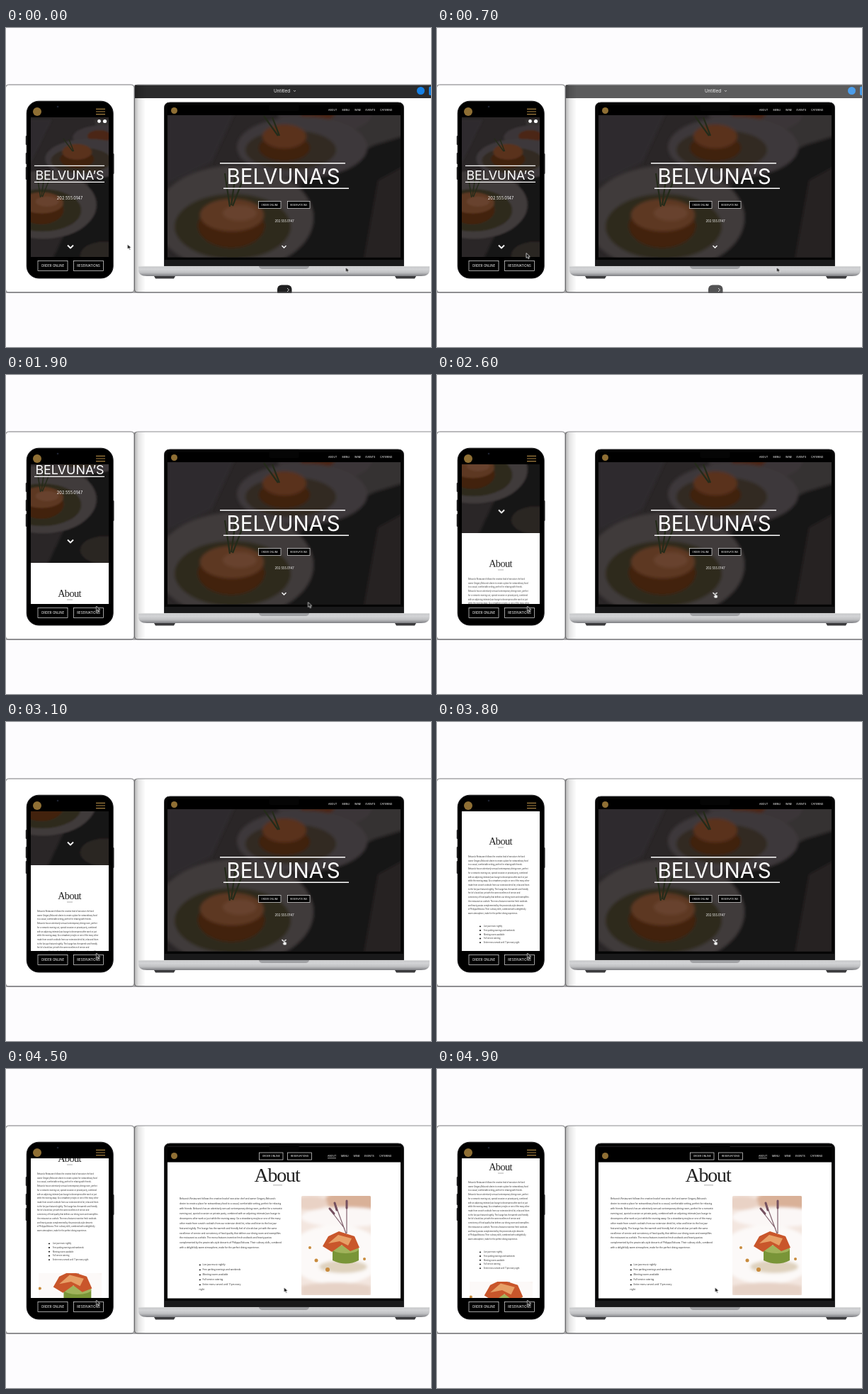
An HTML page for the animation above (5000 ms loop, 600 by 450 pixels).

```html
<!DOCTYPE html>
<html lang="en">
<head>
<meta charset="utf-8">
<title>Restaurant site on phone and laptop</title>
<style>
@property --s { syntax: "<length>"; inherits: true; initial-value: 0px; }
html, body { margin: 0; width: 100%; height: 100%; overflow: hidden; background: #fdfcfe; }
svg { display: block; width: 100%; height: 100%; font-family: Inter, "Liberation Sans", sans-serif; }
.mid { text-anchor: middle; }
.title { font-weight: 400; fill: #fff; text-anchor: middle; }
.about { font-family: "Liberation Serif", serif; fill: #222; text-anchor: middle; }
.copy { font-family: "Open Sans", "Noto Sans", sans-serif; fill: #222; font-weight: 500; }
.line { fill: none; stroke: #fff; }
.btn { fill: #000; stroke: #e4e4e4; stroke-width: .7; }

.ui, .header, .shade, .hand, .arrow, .phone-scroll, .phone-cursor, .laptop, .laptop-cursor {
  animation: 5s -20ms infinite step-end;
}
.ui { animation-name: fade; }
.header { animation-name: header; }
.shade { animation-name: shade; }
.hand { animation-name: hand; }
.arrow { animation-name: arrow; }
.phone-scroll { animation-name: phone-scroll; }
.phone-cursor { animation-name: phone-cursor; }
.laptop-cursor { animation-name: laptop-cursor; }
.laptop { animation-name: laptop-scroll; }
.page { transform: translateY(calc(214px - var(--s))); }
.hero-text { transform: translateY(calc(var(--s) * -.245)); }
.hero-photo { transform: translateY(calc(var(--s) * -.1)); }

@keyframes fade {
  0%, 12% { opacity: 1; animation-timing-function: steps(4); }
  20% { opacity: .08; }
  22% { opacity: .04; }
  24%, 100% { opacity: 0; }
}
@keyframes header { 0% { opacity: 1; } 78%, 100% { opacity: 0; } }
@keyframes shade { 0% { opacity: 0; } 80%, 100% { opacity: .3; } }
@keyframes hand { 0% { opacity: 0; } 50% { opacity: 1; } 78%, 100% { opacity: 0; } }
@keyframes arrow { 0% { opacity: 1; } 50% { opacity: 0; } 78%, 100% { opacity: 1; } }
@keyframes phone-scroll {
  0%, 24% { transform: translateY(0); animation-timing-function: steps(7); }
  38% { transform: translateY(-74px); animation-timing-function: steps(6); }
  50% { transform: translateY(-112px); animation-timing-function: steps(6); }
  62% { transform: translateY(-137px); animation-timing-function: steps(10); }
  82% { transform: translateY(-247px); animation-timing-function: steps(4); }
  90% { transform: translateY(-256px); animation-timing-function: steps(4); }
  98%, 100% { transform: translateY(-244px); }
}
@keyframes laptop-scroll {
  0% { --s: 0px; }
  78% { --s: 6px; }
  80% { --s: 33px; }
  82% { --s: 74px; }
  84% { --s: 126px; }
  86% { --s: 172px; }
  88% { --s: 204px; }
  90%, 100% { --s: 214px; }
}
@keyframes phone-cursor {
  0%, 2% { transform: translate(171.5px, 305px); animation-timing-function: steps(5); }
  12% { transform: translate(126px, 317.5px); }
  24% { transform: translate(126px, 317.5px); animation-timing-function: steps(3); }
  30%, 100% { transform: translate(127.5px, 326px); }
}
@keyframes laptop-cursor {
  0%, 28% { transform: translate(479.5px, 337.5px); animation-timing-function: steps(5); }
  38% { transform: translate(426.5px, 320.5px); animation-timing-function: steps(5); }
  48%, 100% { transform: translate(392.5px, 308px); }
}
</style>
</head>
<body>
<svg viewBox="0 0 600 450">
<defs>
  <linearGradient id="metal" x2="0" y2="1">
    <stop offset="0" stop-color="#c4c5c7"/><stop offset=".3" stop-color="#d3d4d6"/><stop offset=".65" stop-color="#bfc0c2"/><stop offset="1" stop-color="#7d7e82"/>
  </linearGradient>
  <linearGradient id="cast">
    <stop offset="0" stop-color="#000" stop-opacity=".3"/><stop offset=".4" stop-color="#000" stop-opacity=".1"/><stop offset="1" stop-color="#000" stop-opacity="0"/>
  </linearGradient>
  <filter id="soft" x="-5%" y="-5%" width="110%" height="110%"><feGaussianBlur stdDeviation="2"/></filter>
  <clipPath id="phone-screen"><rect x="35" y="126" width="110" height="197"/></clipPath>
  <clipPath id="laptop-screen"><rect x="228" y="109" width="329" height="214.5"/></clipPath>
  <clipPath id="windows"><rect y="79" width="600" height="295"/></clipPath>
  <clipPath id="tall"><rect x="417" y="179" width="98" height="140" rx="1.5"/></clipPath>
  <clipPath id="wide"><rect x="46" y="300" width="89" height="70"/></clipPath>

  <g id="scallops">
    <rect x="200" y="70" width="390" height="360" fill="#2a2627"/>
    <g filter="url(#soft)">
      <path d="M228 83H340L290 190 228 220Z" fill="#2f2b2d"/>
      <path d="M430 83H570V160L520 180 440 150Z" fill="#353132"/>
      <ellipse cx="450" cy="122" rx="66" ry="27" fill="#3b3637"/>
      <ellipse cx="440" cy="119" rx="25" ry="13" fill="#4b2818"/>
      <path d="M420 215 520 165 570 150V300L470 411H330Z" fill="#191617"/>
      <path d="M525 215 570 190V411H490Z" fill="#252122"/>
      <ellipse cx="418" cy="168" rx="92" ry="43" fill="#3e393a"/>
      <ellipse cx="402" cy="172" rx="64" ry="28" fill="#302b22"/>
      <ellipse cx="393" cy="169" rx="36" ry="19" fill="#40200f"/>
      <ellipse cx="393" cy="153" rx="31" ry="17" fill="#5a331f"/>
      <ellipse cx="450" cy="378" rx="50" ry="30" fill="#2a2723"/>
      <ellipse cx="322" cy="268" rx="112" ry="74" fill="#3f3a3b"/>
      <ellipse cx="320" cy="280" rx="82" ry="46" fill="#2f2b1b"/>
      <ellipse cx="318" cy="279" rx="47" ry="31" fill="#42220f"/>
      <ellipse cx="319" cy="264" rx="45" ry="23" fill="#5d3823"/>
      <ellipse cx="330" cy="261" rx="24" ry="11" fill="#67432f"/>
    </g>
    <path d="M316 252 309 205M318 250 325 200M320 251 334 215M384 152 364 124M386 152 376 126" fill="none" stroke="#242b1a" stroke-width="2.2"/>
  </g>

  <g id="dish">
    <rect x="400" y="160" width="130" height="180" fill="#f3e6df"/>
    <g filter="url(#soft)">
      <ellipse cx="492" cy="186" rx="42" ry="16" fill="#d9b198"/>
      <ellipse cx="430" cy="189" rx="24" ry="10" fill="#e9d2c5"/>
      <ellipse cx="480" cy="209" rx="64" ry="14" fill="#fbf7f6"/>
      <ellipse cx="466" cy="262" rx="68" ry="42" fill="#fcf9f8"/>
      <ellipse cx="476" cy="279" rx="34" ry="9" fill="#dfd2be"/>
      <path d="M417 306Q466 296 515 306V320H417Z" fill="#e6d2c6"/>
    </g>
    <path d="M461 253H498V270Q480 279 461 270Z" fill="#799538"/>
    <ellipse cx="479.5" cy="254" rx="18.5" ry="6" fill="#a1b35b"/>
    <path d="M447 250 455 236 470 229 492 236 499 252 486 257 474 248 460 258Z" fill="#c9562b"/>
    <path d="M455 246 469 234 488 239 483 249 471 243Z" fill="#e7a067"/>
    <path d="M480 232 465 191M481 232 481 188M478 225 458 199" fill="none" stroke="#80616d" stroke-width="1.2"/>
    <path d="M464 189 467 199M481 186V196M457 197 463 204" stroke="#74505f" stroke-width="3" stroke-linecap="round"/>
    <g fill="#c88b3d"><circle cx="429" cy="252" r="2"/><circle cx="438" cy="270" r="2.5"/><circle cx="454" cy="283" r="3"/><circle cx="506" cy="268" r="2"/></g>
  </g>

  <path id="pointer" d="M0 0V7L1.7 5.5 2.9 8.2 4.2 7.6 3 5.1H5.3Z" fill="#111" stroke="#fff" stroke-width=".7"/>
</defs>

<rect width="600" height="450" fill="#fdfcfe"/>
<g clip-path="url(#windows)">
  <rect x="181.5" y="80" width="430" height="293" rx="4" fill="#fff" stroke="#8a8a8d"/>
  <g class="ui">
    <rect x="182" y="80.5" width="418" height="18.5" fill="#2b2b2c"/>
    <text x="389.5" y="91" font-size="6.3" fill="#f2f2f2" class="mid">Untitled</text>
    <path d="M406 88l1.5 1.5 1.5-1.5" class="line" stroke-width=".7"/>
    <circle cx="585.5" cy="88.5" r="5.5" fill="#1680e4"/>
    <rect x="597" y="82.5" width="10" height="12.5" rx="2" fill="#1680e4"/>
    <rect x="383" y="362.5" width="20.5" height="16" rx="6" fill="#202021"/>
    <path d="M397 367l2.5 2.5-2.5 2.5" class="line" stroke-width=".8"/>
  </g>
  <rect x="181" y="80.5" width="16" height="292.5" fill="url(#cast)"/>
  <rect x="-.5" y="80" width="181.5" height="293" rx="4" fill="#fff" stroke="#77777a"/>
  <path d="M0 373H600" stroke="#626266"/>
</g>

<!-- phone -->
<g fill="#1b1b1c">
  <rect x="27.8" y="152" width="2" height="13" rx="1"/><rect x="27.8" y="176" width="2" height="16" rx="1"/>
  <rect x="27.8" y="196" width="2" height="18" rx="1"/><rect x="150.5" y="177" width="2" height="29" rx="1"/>
</g>
<rect x="29.2" y="103.2" width="122" height="249.8" rx="17" fill="#000" stroke="#1d1d1f"/>
<g clip-path="url(#phone-screen)">
  <g class="phone-scroll">
    <use href="#scallops" transform="translate(50 252) scale(.67 .65) translate(-318 -272)"/>
    <circle cx="131.5" cy="131.5" r="2.4" fill="#fff"/><circle cx="139.5" cy="131.5" r="2.6" fill="#fff"/>
    <path d="M40 194.3H139M40 217.3H139" class="line" stroke-width="1.3"/>
    <text x="90" y="213.7" font-size="17.9" class="title">BELVUNA’S</text>
    <text x="90" y="242.3" font-size="5.7" fill="#fff" class="mid">202.555.0147</text>
    <path d="M87 306.5l4 4 4-4" class="line" stroke-width="1.8"/>
    <g transform="translate(0 244)">
      <rect x="35" y="95" width="110" height="300" fill="#fff"/>
      <text x="89.5" y="143.2" font-size="14.3" letter-spacing="-.6" class="about">About</text>
      <path d="M86 147H94" stroke="#777" stroke-width=".6"/>
      <g id="phone-copy" class="copy" font-size="2.55"></g>
      <g clip-path="url(#wide)"><use href="#dish" transform="translate(93 311) scale(1.05) translate(-472 -242)"/></g>
    </g>
  </g>
</g>
<circle cx="73" cy="111" r="1.3" fill="#1d2230"/>
<circle cx="44" cy="118" r="6" fill="#8f6f34"/>
<path d="M127 114.3H140M127 118H140M127 121.7H140" stroke="#a58040" stroke-width="1.2"/>
<g font-size="4.4" fill="#fff" class="mid">
  <rect x="45" y="328.5" width="42" height="14" class="btn"/><text x="66" y="337.2">ORDER ONLINE</text>
  <rect x="95.5" y="328.5" width="42" height="14" class="btn"/><text x="116.5" y="337.2">RESERVATIONS</text>
</g>
<g class="phone-cursor"><use href="#pointer"/></g>

<!-- laptop -->
<path d="M223.5 336V113Q223.5 105 231.5 105H553.5Q561.5 105 561.5 113V336Z" fill="#050505" stroke="#2a2a2c"/>
<rect x="224" y="327" width="337" height="9" fill="#19191a"/>
<g class="laptop" clip-path="url(#laptop-screen)">
  <g class="hero-photo"><use href="#scallops"/></g>
  <rect class="shade" x="228" y="109" width="329" height="215"/>
  <g class="hero-text">
    <path d="M302 190.8H479M307 226.3H484" class="line" stroke-width="1.5"/>
    <text x="391.5" y="219.6" font-size="29.5" class="title">BELVUNA’S</text>
    <g font-size="3.25" fill="#fff" class="mid">
      <rect x="356.5" y="244.5" width="31.5" height="10" class="btn"/><text x="372.2" y="250.7">ORDER ONLINE</text>
      <rect x="397.5" y="244.5" width="31.5" height="10" class="btn"/><text x="413.2" y="250.7">RESERVATIONS</text>
      <text x="393" y="274.2" font-size="4.25">202.555.0147</text>
    </g>
    <path d="M389.5 307l3 3 3-3" class="line" stroke-width="1.3"/>
  </g>
  <g class="header">
    <rect x="228" y="108" width="329" height="15" fill="#000"/>
    <circle cx="237.5" cy="116.5" r="4.5" fill="#8f6f34"/>
    <g font-size="3.5" fill="#fff">
      <text x="455" y="117.3">ABOUT</text><text x="474.5" y="117.3">MENU</text><text x="492" y="117.3">WINE</text>
      <text x="507.5" y="117.3">EVENTS</text><text x="528" y="117.3">CATERING</text>
    </g>
  </g>
  <g class="page">
    <rect x="228" y="110" width="329" height="22" fill="#000"/>
    <rect x="228" y="131.5" width="329" height="240" fill="#fff"/>
    <circle cx="237.5" cy="122.5" r="4.5" fill="#8f6f34"/>
    <g font-size="3.4" fill="#fff" class="mid">
      <rect x="357.5" y="118" width="33.5" height="10" class="btn"/><text x="374.2" y="124.3">ORDER ONLINE</text>
      <rect x="397.5" y="118" width="34" height="10" class="btn"/><text x="414.5" y="124.3">RESERVATIONS</text>
    </g>
    <g font-size="3.5" fill="#fff">
      <text x="454" y="124.2">ABOUT</text><text x="473" y="124.2">MENU</text><text x="490.5" y="124.2">WINE</text>
      <text x="506" y="124.2">EVENTS</text><text x="527" y="124.2">CATERING</text>
    </g>
    <path d="M454 125.7H466" stroke="#fff" stroke-width=".6"/>
    <text x="382.5" y="158.5" font-size="28" letter-spacing="-1.2" class="about">About</text>
    <path d="M377 163.8H390" stroke="#888" stroke-width=".7"/>
    <g id="laptop-copy" class="copy" font-size="3.15"></g>
    <g clip-path="url(#tall)"><use href="#dish"/></g>
  </g>
</g>
<path d="M371.5 105.5H413.5V114.5Q413.5 117 411 117H374Q371.5 117 371.5 114.5Z" fill="#050505"/>
<path d="M187 336H598V341Q598 350 586 350H199Q187 350 187 341Z" fill="url(#metal)"/>
<path d="M187 336.4H598" stroke="#e2e3e4" stroke-width=".8"/>
<path d="M357 336H428Q427 340 423 340H362Q358 340 357 336Z" fill="#a0a1a4"/>
<path d="M209 350H239L237 353.5H211ZM549 350H579L577 353.5H551Z" fill="#3b3b3d"/>
<g class="laptop-cursor">
  <use href="#pointer" class="arrow"/>
  <path class="hand" d="M-.3 3V-.2Q.5-1.2 1.3-.2V2.2L3.6 2.8V5.2L2.8 6.8H-.6L-2 4Z" fill="#fff" stroke="#222" stroke-width=".5"/>
</g>
</svg>
<script>
// "/" breaks a line on the phone, "|" on the laptop
const story = "Belvuna’s Restaurant follows the creative lead of executive chef and /owner Gregory Belvuna’s |desire to create a place for extraordinary food /to a casual, comfortable setting, perfect for relaxing |with friends. /Belvuna’s has an attentively sensual contemporary dining room, perfect /for a romantic |evening out, special occasion or private party, combined /with an adjoining intimate Jazz lounge to |decompress after work or just /while the evening away. Go a strawberry mojito or one of the many |other /made from scratch cocktails from our extensive drink list, relax and listen /to the live jazz |featured nightly. The lounge has the warmth and friendly /feel of a locals bar yet with the same |excellence of service and /consistency of food quality that defines our dining room and exemplifies |/the restaurant as a whole. The menu features inventive fresh seafoods /and hearty pastas |complemented by the provincials-style desserts /of Philippa Belvuna. Their culinary skills, combined |with a delightfully /warm atmosphere, make for the perfect dining experience.";
const perks = ["Live jazz music nightly", "Free parking evenings and weekends", "Meeting rooms available", "Full service catering", "Entire menu served until 11pm every"];

const line = (s, x, y) => `<text x="${x}" y="${y}">${s}</text>`;
const rows = (list, x, y, gap) => list.map((s, i) => line(s, x, y + i * gap)).join("");
const dots = (x, y, gap) => perks.map((_, i) =>
  `<ellipse cx="${x}" cy="${y + i * gap}" rx="1.2" ry=".9"/>`).join("");
const breakAt = (mark, other) => story.replaceAll(other, "").split(mark);
const fill = (id, html) => { document.getElementById(id).innerHTML = html; };

fill("phone-copy",
  rows(breakAt("/", "|"), 44, 161, 5.72) +
  rows([...perks.slice(0, 4), perks[4] + " night"], 66, 259.2, 5.7) + dots(61, 258.3, 5.7));
fill("laptop-copy",
  rows(breakAt("|", "/"), 245, 184.2, 6.9) +
  rows(perks, 277.5, 277.2, 7) + line("night", 272.5, 312.2) + dots(273.8, 276.3, 7));
</script>
</body>
</html>
```
